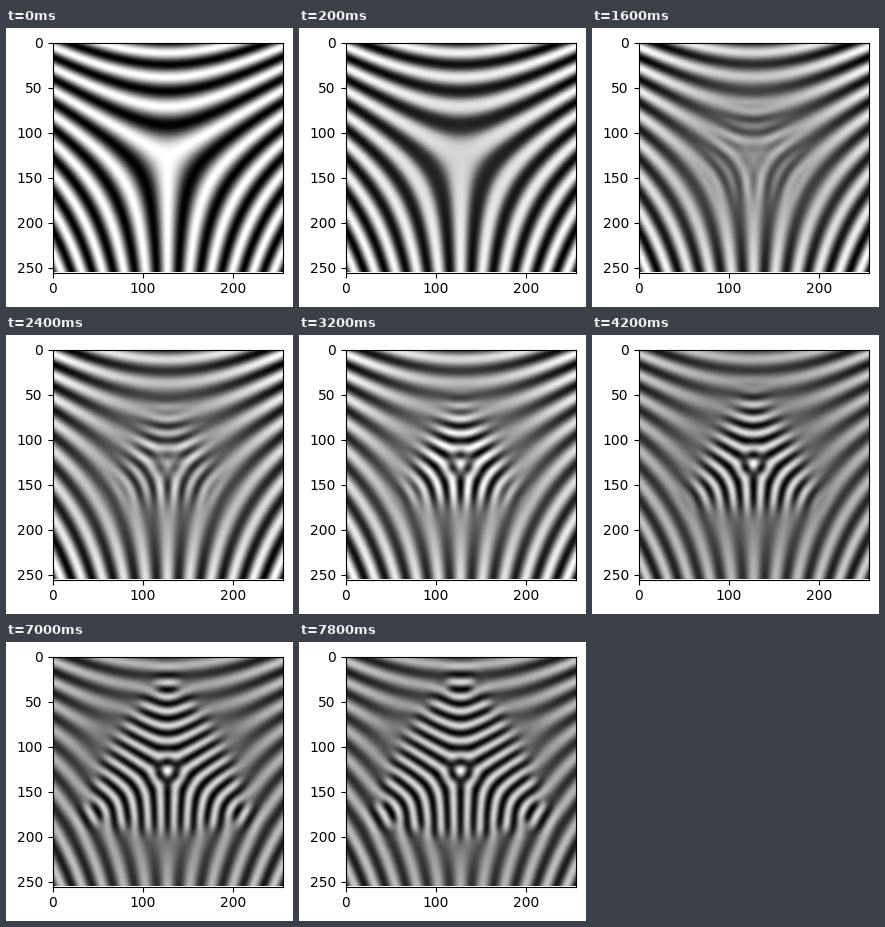
A matplotlib script that plays this animation: 287x279 px, repeating every 8 s.

```python
import numpy as np
import matplotlib.pyplot as plt
from matplotlib.animation import FuncAnimation

W, H, DPI = 287, 279, 100
FRAMES, INTERVAL, SUBSTEPS = 40, 200, 4
SIZE, PAD = 256, 88          # visible grid and hidden margin
CENTER = 127
WAVELENGTH = 16.4            # preferred stripe spacing
GROWTH, DAMPING = 0.25, 0.48  # rates per frame


def start_pattern():
    """Stripes around a three-armed delta singularity."""
    axis = np.arange(SIZE + 2 * PAD) - PAD - CENTER
    x, y = np.meshgrid(axis, axis)
    r, angle = np.hypot(x, y), np.arctan2(x, -y)
    return np.cos(7 * np.pi * (r / 128) ** 1.5 * np.cos(1.5 * angle))


def evolve(u):
    """Swift-Hohenberg evolution by operator splitting, one state per frame."""
    n = len(u)
    k2 = np.fft.fftfreq(n)[:, None] ** 2 + np.fft.rfftfreq(n)[None, :] ** 2
    dt = 1 / SUBSTEPS
    rate = GROWTH - DAMPING * (1 - k2 * WAVELENGTH ** 2) ** 2
    gain = np.exp(rate * dt)
    cubic = 2 * dt * GROWTH * 4 / 3
    view = slice(PAD, PAD + SIZE)
    states = [u[view, view]]
    for _ in range(FRAMES - 1):
        for _ in range(SUBSTEPS):
            u = u / np.sqrt(1 + cubic * u * u)
            u = np.fft.irfft2(gain * np.fft.rfft2(u), s=u.shape)
        states.append(u[view, view])
    return states


states = evolve(start_pattern())

fig = plt.figure(figsize=(W / DPI, H / DPI), dpi=DPI, facecolor="white")
ax = fig.add_axes([46.5 / W, 34.5 / H, 230 / W, 230 / H])
image = ax.imshow(states[0], cmap="gray")
ax.set_xticks([0, 100, 200])
ax.set_yticks(range(0, 251, 50))


def draw(i):
    image.set_data(states[i])
    image.autoscale()
    return [image]


anim = FuncAnimation(fig, draw, frames=FRAMES, interval=INTERVAL,
                     init_func=lambda: draw(0), repeat=True, repeat_delay=0)
plt.show()
```
